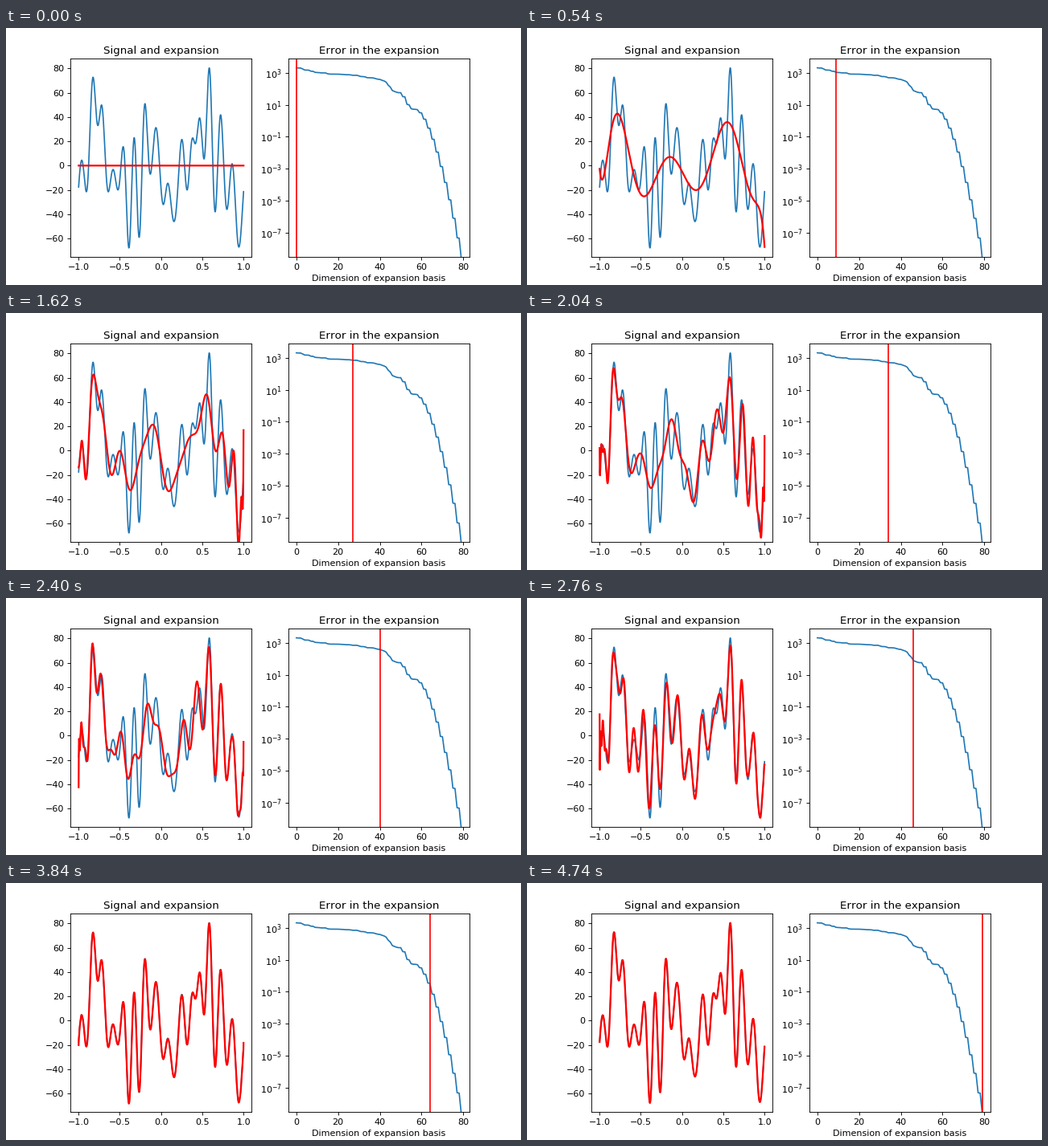
Animation of 640x320 px, one loop 4.8 s. Source, as a matplotlib script:

```python
import numpy as np
import matplotlib.pyplot as plt
from matplotlib.animation import FuncAnimation
from numpy.polynomial import legendre as leg

STEPS = 80
DEGREE = 120
PERIOD = 2.0036
HARMONICS = np.arange(1, 21)
FASTEST = [4, 2.1]  # size of the last cosine and sine

# Key points of the signal: place of a peak, its height, depth of the next valley.
PEAKS, HEIGHTS, DEPTHS = np.array([
    (-.961, 4.5, -21.5), (-.834, 70, 33), (-.727, 49.5, -21.5),
    (-.551, -12, -20), (-.454, 14.5, -67.7), (-.327, 23, -59),
    (-.195, 51, -7), (-.063, 31.3, -32), (.083, -14.5, -46),
    (.254, 21.5, -20), (.380, 22.7, 18), (.463, 39, 5.5),
    (.583, 80.4, -38), (.720, 41.7, -36), (.863, 1.5, -67),
]).T


def harmonics(x):
    phase = 2 * np.pi / PERIOD * np.outer(x, HARMONICS)
    return np.hstack([np.cos(phase), np.sin(phase)])


def slopes(x):
    rate = 2 * np.pi / PERIOD * HARMONICS
    phase = np.outer(x, rate)
    return np.hstack([-rate * np.sin(phase), rate * np.cos(phase)])


def fit_signal():
    """Smooth band-limited curve through the peaks and valleys.

    Valleys start halfway between peaks and slide to the curve's own minima.
    """
    bounds = np.append(PEAKS, PEAKS[0] + PERIOD)
    valleys = (bounds[:-1] + bounds[1:]) / 2
    spread = np.tile(np.where(HARMONICS > 17, 1.5, 10), 2)
    last = [len(HARMONICS) - 1, -1]
    amps = np.zeros(len(spread))
    for _ in range(30):
        prior = np.zeros(len(spread))
        prior[last] = FASTEST * np.sign(amps[last])
        rows = np.vstack([harmonics(PEAKS) / .4, harmonics(valleys) / .4,
                          slopes(PEAKS) / 400, np.diag(1 / spread)])
        goal = np.concatenate([HEIGHTS / .4, DEPTHS / .4,
                               np.zeros(len(PEAKS)), prior / spread])
        amps = np.linalg.lstsq(rows, goal, rcond=None)[0]
        for i in range(len(valleys)):
            span = np.linspace(bounds[i], bounds[i + 1], 200)
            lowest = span[np.argmin(harmonics(span) @ amps)]
            valleys[i] += .5 * (lowest - valleys[i])
    return amps


def legendre_series(amps):
    nodes, weights = leg.leggauss(240)
    moments = leg.legvander(nodes, DEGREE).T @ (weights * (harmonics(nodes) @ amps))
    return (np.arange(DEGREE + 1) + .5) * moments


coefs = legendre_series(fit_signal())
energy = coefs ** 2 / (np.arange(DEGREE + 1) + .5)
error = np.cumsum(energy[::-1])[::-1][1:STEPS + 1]

x = np.linspace(-1, 1, 1500)
polys = leg.legvander(x, DEGREE)

plt.rcParams["text.kerning_factor"] = 6
fig, (left, right) = plt.subplots(1, 2, figsize=(8, 4), dpi=80)
left.set_title("Signal and expansion")
left.plot(x, polys @ coefs)
left.set_ylim(-74.95, 87.88)
expansion, = left.plot([], [], "r", lw=2)

right.set_title("Error in the expansion")
right.set_xlabel("Dimension of expansion basis")
right.semilogy(np.arange(STEPS), error)
right.set_xlim(-.05 * (STEPS - 1), 1.05 * (STEPS - 1))
right.set_ylim(10 ** -8.507, 10 ** 3.874)
marker = right.axvline(0, color="r")


def update(n):
    expansion.set_data(x, polys[:, :n + 1] @ coefs[:n + 1])
    marker.set_xdata([n, n])
    return expansion, marker


anim = FuncAnimation(fig, update, frames=STEPS, interval=60,
                     repeat=True, repeat_delay=0)
plt.show()
```
